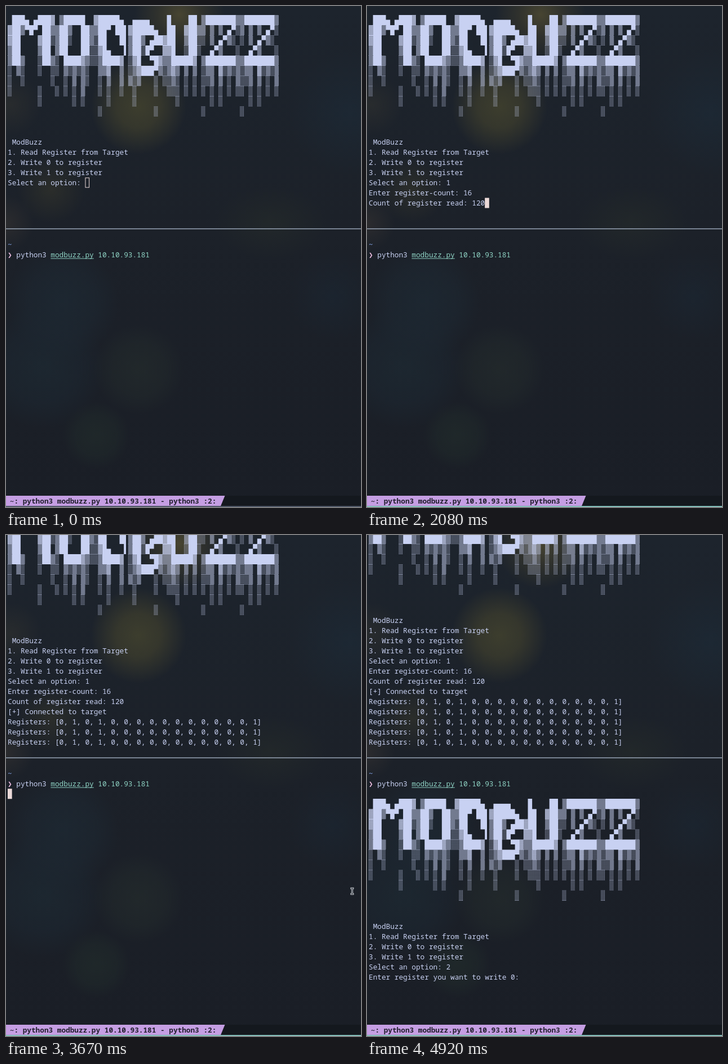
An HTML page with a canvas for the animation above (5 s loop, 630 by 889 pixels).

```html
<!DOCTYPE html>
<html lang="en">
<head>
<meta charset="utf-8">
<title>ModBuzz terminal</title>
<style>
  html, body { margin: 0; width: 100%; height: 100%; overflow: hidden; }
  body {
    background:
      radial-gradient(circle 85px at 235px 178px, #42422ed8, #3d3d2dc0 45%, transparent),
      radial-gradient(circle 80px at 308px 15px, #4d4932e0, #3d3b2d90 50%, transparent),
      radial-gradient(circle 60px at 80px 325px, #32332bb0, transparent),
      radial-gradient(circle 55px at 8px 175px, #2c2e2ec0, transparent),
      radial-gradient(circle 50px at 0 385px, #302f30c0, transparent),
      radial-gradient(ellipse 100px 65px at 470px 385px, #23292ad0, transparent),
      radial-gradient(circle 80px at 235px 645px, #22292be0, #21282ba0 60%, transparent),
      radial-gradient(circle 60px at 160px 762px, #20292ae0, #1f282aa0 60%, transparent),
      radial-gradient(circle 110px at 610px 190px, #1d2935d0, transparent),
      radial-gradient(circle 100px at 100px 525px, #1d2832e0, #1d2731a0 60%, transparent),
      radial-gradient(circle 80px at 580px 515px, #1b2530d0, transparent),
      radial-gradient(circle 110px at 65px 640px, #1d2831e0, #1c2630a0 60%, transparent),
      linear-gradient(#1d242d, #1c2129 45%, #1a1e26);
  }
  canvas { display: block; }
</style>
</head>
<body>
<canvas id="stage" width="630" height="889"></canvas>
<script>
const ctx = document.getElementById('stage').getContext('2d');
const LOOP = 5, COL = 7.635, ROW = 18.03, LEFT = 3, TOP = -2.1;
const PANE_ROWS = 22, PANE_GAP = 1.6;
const FONT = '12.725px "Noto Sans Mono", "DejaVu Sans Mono", monospace';
const INK = '#c8d1f2', TEAL = '#8fd3c4', MAUVE = '#c59ee3', CURSOR = '#ecdad9';

const BANNER = [
  ' ███▄ ▄███▓ ▒█████  ▓█████▄  ▄▄▄▄    █    ██ ▒███████▒▒███████▒',
  '▓██▒▀█▀ ██▒▒██▒  ██▒▒██▀ ██▌▓█████▄  ██  ▓██▒▒ ▒ ▒ ▄▀░▒ ▒ ▒ ▄▀░',
  '▓██    ▓██░▒██░  ██▒░██   █▌▒██▒ ▄██▓██  ▒██░░ ▒ ▄▀▒░ ░ ▒ ▄▀▒░ ',
  '▒██    ▒██ ▒██   ██░░▓█▄   ▌▒██░█▀  ▓▓█  ░██░  ▄▀▒   ░  ▄▀▒   ░',
  '▒██▒   ░██▒░ ████▓▒░░▒████▓ ░▓█  ▀█▓▒▒█████▓ ▒███████▒▒███████▒',
  '░ ▒░   ░  ░░ ▒░▒░▒░  ▒▒▓  ▒ ░▒▓███▀▒░▒▓▒ ▒ ▒ ░▒▒ ▓░▒░▒░▒▒ ▓░▒░▒',
  '░  ░      ░  ░ ▒ ▒░  ░ ▒  ▒ ▒░▒   ░ ░░▒░ ░ ░ ░░▒ ▒ ░ ▒░░▒ ▒ ░ ▒',
  '░      ░   ░ ░ ░ ▒   ░ ░  ░  ░    ░  ░░░ ░ ░ ░ ░ ░ ░ ░░ ░ ░ ░ ░',
  '       ░       ░ ░     ░     ░         ░       ░ ░      ░ ░',
  '                     ░            ░          ░        ░'
];
const MENU = [' ModBuzz', '1. Read Register from Target', '2. Write 0 to register', '3. Write 1 to register'];
const REGISTERS = 'Registers: [0, 1, 0, 1, 0, 0, 0, 0, 0, 0, 0, 0, 0, 0, 0, 1]';
const COMMAND = 'python3 modbuzz.py 10.10.93.181';

// Pixel rule of each block glyph in an 8 by 19 cell.
const GLYPHS = {
  '█': () => true,
  '▀': (x, y) => y < 9,
  '▄': (x, y) => y >= 9,
  '▌': x => x < 4,
  '░': (x, y) => x % 2 === 0 && y % 2 === 0,
  '▒': (x, y) => (x + y) % 2 === 0,
  '▓': (x, y) => x % 2 === 0 || y % 2 === 0
};

function renderBanner() {
  const image = document.createElement('canvas');
  image.width = 63 * 8;
  image.height = BANNER.length * 19;
  const pen = image.getContext('2d');
  pen.fillStyle = INK;
  BANNER.forEach((line, row) => [...line].forEach((char, col) => {
    const lit = GLYPHS[char];
    if (!lit) return;
    for (let y = 0; y < 19; y++)
      for (let x = 0; x < 8; x++)
        if (lit(x, y)) pen.fillRect(col * 8 + x, row * 19 + y, 1, 1);
  }));
  return image;
}
const banner = renderBanner();

const rowTop = row => TOP + row * ROW;
const colLeft = col => LEFT + col * COL;

function text(string, x, baseline, color = INK, weight = '') {
  ctx.font = `${weight} ${FONT}`;
  ctx.fillStyle = color;
  [...string].forEach((char, i) => ctx.fillText(char, x + i * COL, baseline));
}
const cellText = (string, col, row, color, weight) =>
  text(string, colLeft(col), rowTop(row) + 13.9, color, weight);

function box(x, y, w, h, color) {
  ctx.fillStyle = color;
  ctx.fillRect(x, y, w, h);
}

function drawSession(lines, firstRow) {
  ctx.drawImage(banner, LEFT, rowTop(firstRow), 63 * COL, BANNER.length * ROW);
  lines.forEach((line, i) => cellText(line, 0, firstRow + 12 + i));
}

const FOCUS = 0.25, CONFIRM = 2.22, SWITCH = 3, RUN = 3.5, READY = 3.84;
const KEYS = [0, FOCUS, 0.42, 0.65, 1.42, 1.5, 1.7, 1.92, 2, 2.07, CONFIRM, SWITCH, RUN, 4.17, 4.33];

function drawCursor(col, row, t) {
  const x = colLeft(col), y = rowTop(row);
  if (t < FOCUS) {
    ctx.strokeStyle = CURSOR;
    ctx.lineWidth = 1;
    ctx.strokeRect(x + 0.5, y + 0.5, COL - 1, ROW - 1);
    return;
  }
  const idle = t - KEYS.findLast(key => key <= t);
  if (idle % 1 < 0.5) box(x, y, COL, ROW, CURSOR);
}

const typed = (string, start, t) =>
  string.slice(0, Math.max(0, Math.floor((t - start) / 0.075) + 1));

function drawTopPane(t) {
  const lines = [...MENU, 'Select an option: ' + typed('1', 0.42, t)];
  if (t >= 0.65) lines.push('Enter register-count: ' + typed('16', 1.42, t));
  if (t >= 1.7) lines.push('Count of register read: ' + typed('120', 1.92, t));
  if (t >= CONFIRM) {
    const polls = Math.min(5, Math.floor((t - CONFIRM) / 0.545) + 1);
    lines.push('[+] Connected to target', ...Array(polls).fill(REGISTERS), '');
  }
  const scroll = Math.max(0, 13 + lines.length - PANE_ROWS);
  ctx.save();
  ctx.beginPath();
  ctx.rect(0, 0, 630, 395.5);
  ctx.clip();
  drawSession(lines, 1 - scroll);
  if (t < SWITCH) drawCursor(lines.at(-1).length, 12 + lines.length - scroll, t);
  ctx.restore();
}

function drawShell(t) {
  cellText('~', 0, 23, '#8aadf4');
  cellText('❯', 0, 24, '#f0bfe4', 'bold');
  cellText('python3', 2, 24);
  cellText('modbuzz.py', 10, 24, TEAL);
  cellText('10.10.93.181', 21, 24, TEAL);
  box(colLeft(10), rowTop(24) + 15.4, 10 * COL, 1, TEAL);
  if (t < SWITCH) return;
  if (t < RUN) return drawCursor(33, 24, t);
  if (t < READY) return drawCursor(0, 25, t);
  const lines = [...MENU, 'Select an option: ' + typed('2', 4.17, t)];
  if (t >= 4.33) lines.push('Enter register you want to write 0: ');
  drawSession(lines, 26);
  drawCursor(lines.at(-1).length, 37 + lines.length, t);
}

function drawBottomPane(t) {
  ctx.save();
  ctx.translate(0, PANE_GAP);
  drawShell(t);
  ctx.restore();
}

function drawTabBar(t) {
  box(0, 869, 630, 18.3, '#14181e');
  ctx.fillStyle = MAUVE;
  ctx.beginPath();
  ctx.moveTo(0, 869);
  ctx.lineTo(388.5, 869);
  ctx.lineTo(381, 887.3);
  ctx.lineTo(0, 887.3);
  ctx.fill();
  text(`~: ${COMMAND} - python3 :2:`, 6.8, 883, '#22202f', 'bold');
  box(0, 887.3, 630, 1.7, t < FOCUS ? '#555d6e' : '#93d8d0');
}

function drawPointer(t) {
  if (t < 2.95 || t >= 4.75) return;
  const ease = (1 - Math.min(1, (t - 2.95) / 0.4)) ** 3;
  const x = 614.3 + 16 * ease, y = 632 - 14 * ease;
  for (const [width, color] of [[3, '#c9ccd2'], [1, '#20242c']]) {
    const edge = width / 2 - 0.5;
    ctx.strokeStyle = color;
    ctx.lineWidth = width;
    ctx.beginPath();
    ctx.moveTo(x, y - 5);
    ctx.lineTo(x, y + 5);
    for (const end of [-5, 5]) {
      ctx.moveTo(x - 2 - edge, y + end);
      ctx.lineTo(x + 2 + edge, y + end);
    }
    ctx.stroke();
  }
}

function draw() {
  const t = performance.now() / 1000 % LOOP;
  ctx.clearRect(0, 0, 630, 889);
  drawTopPane(t);
  box(0, 394.7, 630, 1.4, '#a0adbf');
  drawBottomPane(t);
  drawTabBar(t);
  drawPointer(t);
  requestAnimationFrame(draw);
}
ctx.imageSmoothingQuality = 'high';
draw();
</script>
</body>
</html>
```
